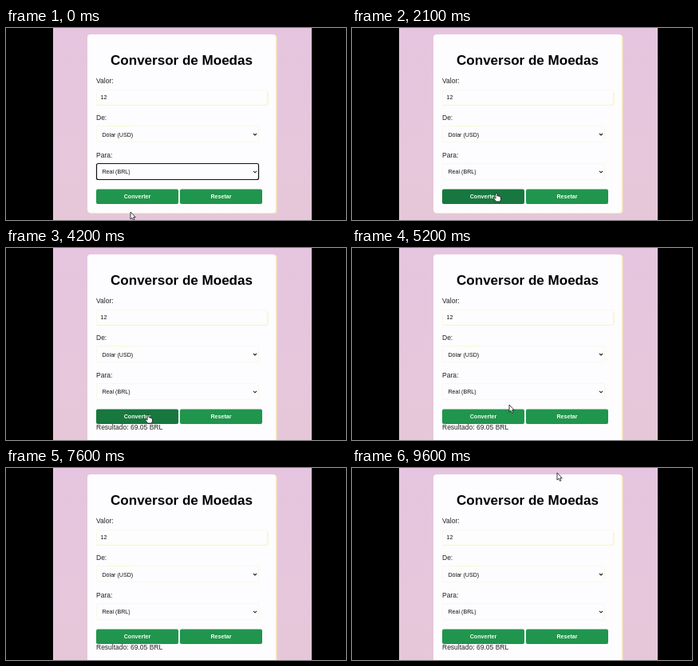
These frames come from a looping animation (426x240 px, 9700 ms). An HTML page:

```html
<!DOCTYPE html>
<html lang="pt">
<head>
<meta charset="utf-8">
<style>
  html, body { margin: 0; width: 100%; height: 100%; overflow: hidden; background: #000; }
  svg { display: block; width: 426px; height: 240px; font-family: "Liberation Sans", Arial, sans-serif; fill: #111; }
  .label { font-size: 8.5px; fill: #222; }
  .field { font-size: 7.1px; }
  .button { font-size: 7.1px; font-weight: bold; fill: #f2fff4; text-anchor: middle; }
  .title { font-size: 17.05px; font-weight: bold; fill: #000; text-anchor: middle; }
  .box { fill: none; stroke: #f8f8ea; }
  .chevron { fill: none; stroke: #222; stroke-width: 1.1; }
  .cursor { fill: #fff; stroke: #111; stroke-width: .8; stroke-linejoin: round; }
</style>
</head>
<body>
<svg viewBox="0 0 426 240">
  <defs>
    <linearGradient id="sky" x2="0" y2="1">
      <stop stop-color="#e5c5df"/>
      <stop offset="1" stop-color="#e6c7d9"/>
    </linearGradient>
  </defs>
  <rect x="59" width="324" height="240" fill="url(#sky)"/>
  <rect id="shade" x="103" y="8.5" width="236.5" height="223.5" rx="4" fill="#f5e8bb"/>
  <rect id="card" x="102" y="8" width="236" height="223" rx="4" fill="#fdfcfe"/>

  <text class="title" x="220" y="46">Conversor de Moedas</text>
  <text class="label" x="113" y="69">Valor:</text>
  <text class="label" x="113" y="115">De:</text>
  <text class="label" x="113" y="162">Para:</text>

  <rect class="box" x="113.5" y="77.5" width="214" height="19" rx="2"/>
  <path d="M114 96.5H326Q328 96.5 328 94V80" fill="none" stroke="#f8f6b4"/>
  <rect class="box" x="113.5" y="122.5" width="203" height="20" rx="2"/>
  <path d="M126 122.5H158" stroke="#fafac8"/>
  <rect class="box" x="113.5" y="169.5" width="203" height="20" rx="2"/>
  <rect id="focus" x="113.5" y="169.5" width="203" height="20" rx="2" fill="none" stroke="#111" stroke-width="1.2"/>
  <text class="field" x="118.5" y="89">12</text>
  <text class="field" x="120.5" y="135.5">Dólar (USD)</text>
  <text class="field" x="120.5" y="182.2">Real (BRL)</text>
  <path class="chevron" d="M310 132l2 2 2-2M310 178.800l2 2 2-2"/>

  <rect id="convert" x="113" y="201.500" width="103" height="18.500" rx="2"/>
  <rect id="reset" x="218" y="201.500" width="103" height="18.500" rx="2"/>
  <text class="button" x="164.500" y="213">Converter</text>
  <text class="button" x="269.500" y="213">Resetar</text>
  <text class="label" id="result" x="113" y="227.300">Resultado: 69.05 BRL</text>

  <path class="cursor" id="arrow" d="M0 0V9L2 7.200 3.500 10.300 5 9.600 3.600 6.600H6.200Z"/>
  <path class="cursor" id="hand" d="M-1 1Q0-.7 1 1V4Q2 3.200 2.800 4.300 3.800 3.800 4.300 5 5.500 4.800 5.500 6V8.500L4.500 11H-.5L-3.500 7Q-3.500 5.400-2.200 6L-1 7.200Z"/>
</svg>
<script>
  const LOOP = 9700, CLICK = 1700, ANSWER = 3700;
  const $ = id => document.getElementById(id);
  const show = (id, on) => $(id).setAttribute('visibility', on ? 'visible' : 'hidden');

  // Pointer stops: time, x, y
  const stops = [
    [0, 156, 230], [300, 156, 230], [1200, 181, 206], [2300, 181, 206],
    [2900, 178, 208], [4400, 178, 208], [5000, 197, 196], [5600, 197, 196],
    [6500, 250, -14], [7700, 257, -14], [8200, 257, 6], [LOOP, 257, 6]
  ];

  function pointerAt(t) {
    const i = stops.findIndex(s => s[0] > t);
    const [t0, x0, y0] = stops[i - 1], [t1, x1, y1] = stops[i];
    const p = (t - t0) / (t1 - t0), k = p * p * (3 - 2 * p);
    return [x0 + (x1 - x0) * k, y0 + (y1 - y0) * k];
  }

  function frame() {
    const t = performance.now() % LOOP;
    const [x, y] = pointerAt(t);
    const inRow = y > 201 && y < 220;
    const onConvert = inRow && x > 113 && x < 216;
    const onReset = inRow && x > 218 && x < 321;
    const done = t >= ANSWER;

    show('focus', t < CLICK);
    show('result', done);
    $('card').setAttribute('height', done ? 240 : 223);
    $('shade').setAttribute('height', done ? 240 : 223.5);
    $('convert').setAttribute('fill', onConvert ? '#17773f' : '#20954d');
    $('reset').setAttribute('fill', onReset ? '#17773f' : '#20954d');

    const hand = onConvert || onReset;
    show('hand', hand);
    show('arrow', !hand);
    for (const id of ['hand', 'arrow']) $(id).setAttribute('transform', `translate(${x} ${y})`);
    requestAnimationFrame(frame);
  }
  frame();
</script>
</body>
</html>
```
